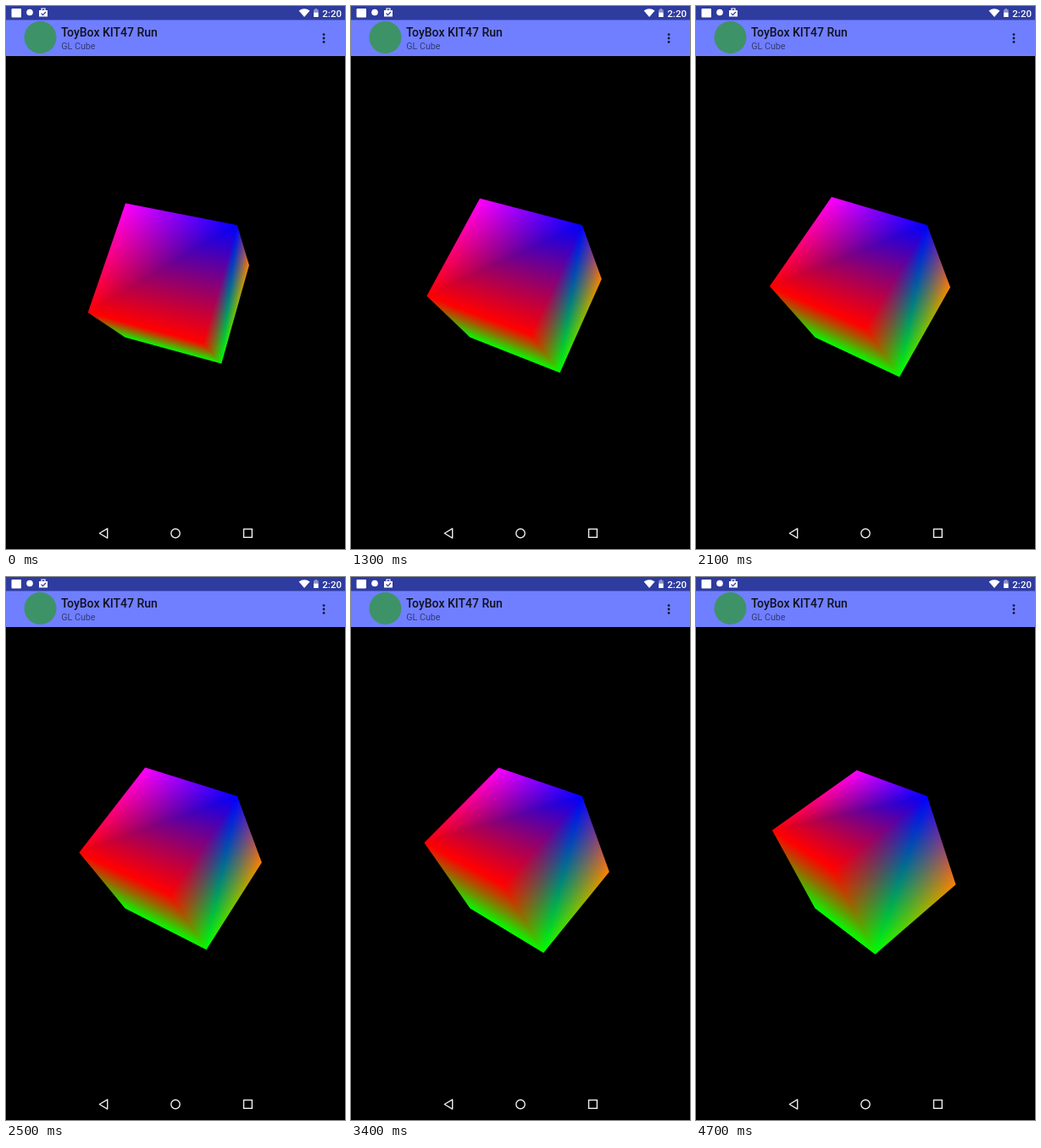
An HTML page with a canvas for the animation above (4800 ms loop, 400 by 640 pixels).

```html
<!DOCTYPE html>
<html lang="en">
<head>
<meta charset="utf-8">
<title>Turning cube</title>
<style>
  html, body { margin: 0; width: 100%; height: 100%; overflow: hidden; background: #000; }
  #stage { position: relative; width: 400px; height: 640px; overflow: hidden; background: #000; }
  svg, canvas { position: absolute; display: block; }
  svg { left: 0; top: 0; }
  canvas { left: 80px; top: 211px; }
  text { font-family: Roboto, "Noto Sans", sans-serif; }
</style>
</head>
<body>
<div id="stage">
  <svg width="400" height="640" viewBox="0 0 400 640">
    <rect width="400" height="17" fill="#2e3b9f"/>
    <rect y="16.5" width="400" height="42.5" fill="#707fff"/>

    <!-- status bar -->
    <g fill="#fff">
      <rect x="6.5" y="3" width="11.5" height="10.5" rx="1"/>
      <circle cx="28" cy="7.5" r="3.8"/>
      <path d="M39 5h10v7.5h-10z"/>
      <path d="M42 5V3h4v2" fill="none" stroke="#fff" stroke-width="1.2"/>
      <path d="M41.5 8.6l2 2 3.4-3.6" fill="none" stroke="#2e3b9f" stroke-width="1.2"/>
      <path d="M345.5 5.5Q352 .8 358.5 5.5L352 13z"/>
      <path d="M363 4.2h1.6V3h2.4v1.2h1.6v3.3H363z" opacity=".45"/>
      <path d="M363 7.5h5.6V13H363z"/>
      <text x="373.3" y="12.6" font-size="11.5" font-weight="500">2:20</text>
    </g>

    <!-- app bar -->
    <circle cx="40.5" cy="37" r="19" fill="#3d9367"/>
    <text x="65" y="36" font-size="14" font-weight="500" fill="#10101f">ToyBox KIT47 Run</text>
    <text x="65.3" y="51.3" font-size="10.7" fill="#333a74">GL Cube</text>
    <g fill="#14162e">
      <circle cx="375" cy="33.6" r="1.4"/>
      <circle cx="375" cy="38" r="1.4"/>
      <circle cx="375" cy="42.4" r="1.4"/>
    </g>

    <!-- navigation bar -->
    <g fill="none" stroke="#eeeeea" stroke-width="1.4">
      <path d="M110.3 621.5l9.4-5.6v11.2z" stroke-linejoin="round"/>
      <circle cx="200" cy="621.5" r="5.2"/>
      <rect x="280.5" y="616.5" width="9.8" height="9.8"/>
    </g>
  </svg>
  <canvas id="cube" width="240" height="240"></canvas>
</div>
<script>
const LOOP = 4800, STEP = 100;
const START = -26.2, TURN = -0.89;      // degrees, degrees per step
const SIZE = 240, FOCAL = 655, DIST = 10;

const points = [
  [-1, -1, -1], [1, -1, -1], [1, 1, -1], [-1, 1, -1],
  [-1, -1, 1], [1, -1, 1], [1, 1, 1], [-1, 1, 1]
];
const GREEN = [0, 255, 0], ORANGE = [255, 128, 0], RED = [255, 0, 0];
const colors = [GREEN, GREEN, ORANGE, ORANGE, RED, RED, [0, 0, 255], [255, 0, 255]];
const faces = [[0, 4, 5, 1], [1, 5, 6, 2], [2, 6, 7, 3], [3, 7, 4, 0], [4, 7, 6, 5], [3, 0, 1, 2]];
const outline = [7, 6, 2, 1, 0, 4];

const ctx = document.getElementById("cube").getContext("2d");
const image = ctx.createImageData(SIZE, SIZE);

// Rotate about the (1,1,1) diagonal, then project.
function project([x, y, z], angle) {
  const c = Math.cos(angle), s = Math.sin(angle) / Math.sqrt(3);
  const m = (x + y + z) / 3 * (1 - c);
  const depth = DIST - (z * c + (y - x) * s + m);
  const k = FOCAL / depth;
  return {
    x: SIZE / 2 + (x * c + (z - y) * s + m) * k,
    y: SIZE / 2 - (y * c + (x - z) * s + m) * k,
    w: 1 / depth
  };
}

const cross = (a, b, x, y) => (b.x - a.x) * (y - a.y) - (b.y - a.y) * (x - a.x);
const length = (a, b) => Math.hypot(b.x - a.x, b.y - a.y);

// Perspective-correct shading, with a small margin that is trimmed later.
function shade(p, ids) {
  const [a, b, c] = ids.map(i => p[i]);
  const [ca, cb, cc] = ids.map(i => colors[i]);
  if (cross(a, b, c.x, c.y) <= 0) return;
  const la = length(b, c), lb = length(c, a), lc = length(a, b);
  const x0 = Math.max(0, Math.floor(Math.min(a.x, b.x, c.x)) - 2);
  const x1 = Math.min(SIZE, Math.ceil(Math.max(a.x, b.x, c.x)) + 2);
  const y0 = Math.max(0, Math.floor(Math.min(a.y, b.y, c.y)) - 2);
  const y1 = Math.min(SIZE, Math.ceil(Math.max(a.y, b.y, c.y)) + 2);
  const data = image.data;
  for (let y = y0; y < y1; y++) {
    for (let x = x0; x < x1; x++) {
      const ea = cross(b, c, x + .5, y + .5);
      const eb = cross(c, a, x + .5, y + .5);
      const ec = cross(a, b, x + .5, y + .5);
      const edge = Math.min(ea / la, eb / lb, ec / lc);
      const at = (y * SIZE + x) * 4;
      if (edge < -1.5 || (edge < 0 && data[at + 3])) continue;
      const wa = ea * a.w, wb = eb * b.w, wc = ec * c.w, sum = wa + wb + wc;
      for (let i = 0; i < 3; i++) {
        data[at + i] = (wa * ca[i] + wb * cb[i] + wc * cc[i]) / sum;
      }
      data[at + 3] = 255;
    }
  }
}

function draw(step) {
  const angle = (START + TURN * step) * Math.PI / 180;
  const p = points.map(v => project(v, angle));
  image.data.fill(0);
  for (const [a, b, c, d] of faces) {
    shade(p, [a, b, c]);
    shade(p, [a, c, d]);
  }
  ctx.putImageData(image, 0, 0);

  // Trim to a smooth silhouette.
  ctx.globalCompositeOperation = "destination-in";
  ctx.beginPath();
  for (const i of outline) ctx.lineTo(p[i].x, p[i].y);
  ctx.closePath();
  ctx.fill();
}

const begin = performance.now();
let shown = -1;
function tick() {
  const step = Math.floor((performance.now() - begin) % LOOP / STEP);
  if (step !== shown) draw(shown = step);
  requestAnimationFrame(tick);
}
tick();
</script>
</body>
</html>
```
